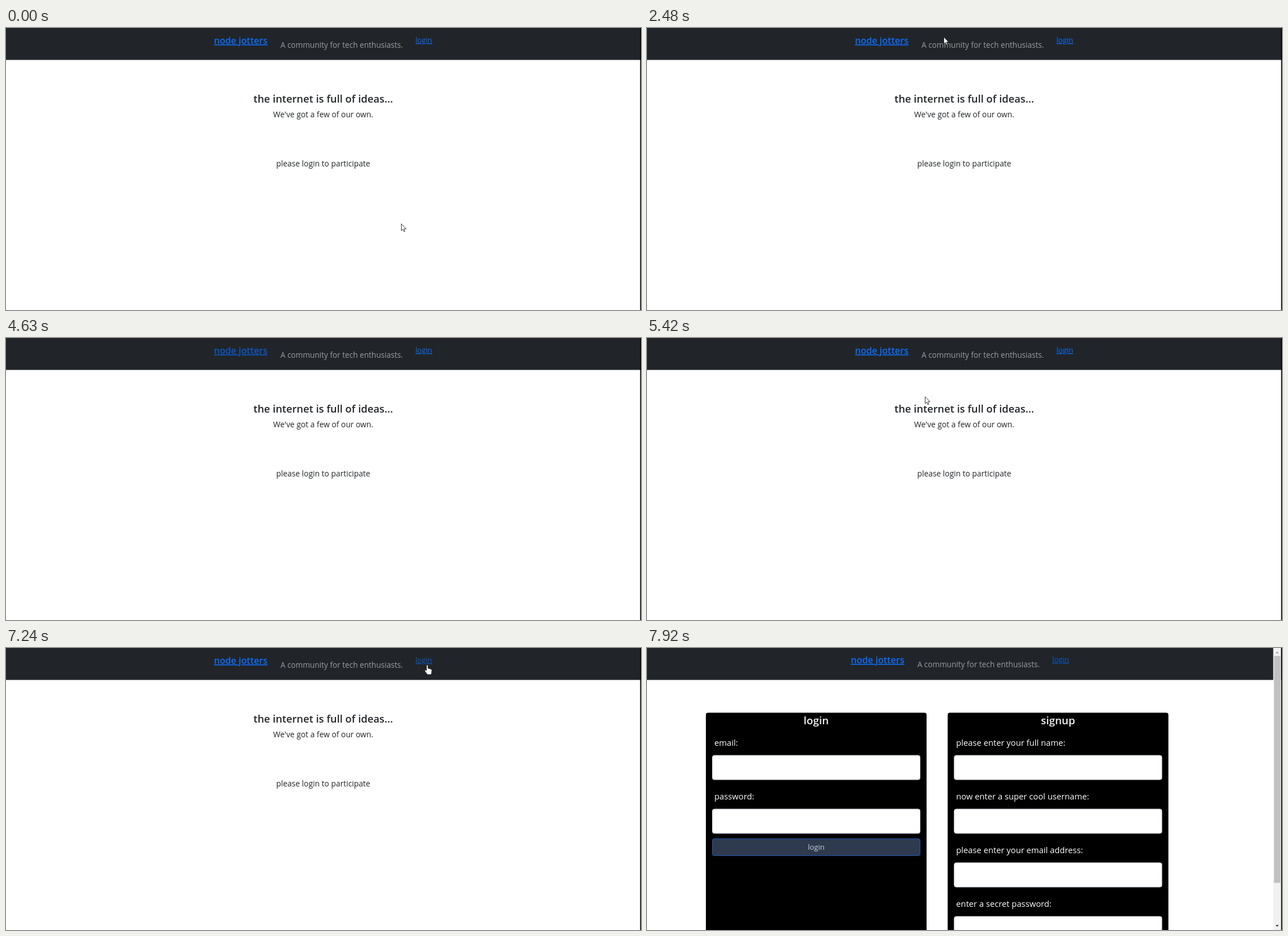
Animation, 1122 px wide and 499 px high, one loop 8 s. Source, as an HTML page:

```html
<!DOCTYPE html>
<html lang="en">
<head>
<meta charset="utf-8">
<style>
  html, body { margin: 0; width: 100%; height: 100%; overflow: hidden; background: #fff; }
  svg { display: block; font: 13.8px "Open Sans", "Noto Sans", sans-serif; fill: #212529; }
  .link { fill: #0d6efd; text-decoration: underline; }
  .link.hover { fill: #0a58ca; }
  .strong { font-weight: 600; }
  .mid { text-anchor: middle; }
  .label { font-size: 14.75px; fill: #fff; }
  .title { font-size: 18.8px; fill: #f4f4f4; }
  .field { fill: #fff; stroke: #ced4da; }
  .pointer { fill: #fff; stroke: #222; stroke-width: .9; stroke-linejoin: round; }
</style>
</head>
<body>
<svg width="1122" height="499" viewBox="0 0 1122 499">
  <rect width="1122" height="56.5"/>
  <g id="nav">
    <text id="brand" class="link strong" x="367.5" y="28" font-size="16.1">node jotters</text>
    <text x="485" y="34.5" font-size="13.6" fill="#9b9d9f">A community for tech enthusiasts.</text>
    <text id="login" class="link" x="723.5" y="26" font-size="13">login</text>
  </g>
  <g id="home" class="mid">
    <text class="strong" x="560.5" y="132" font-size="18.3">the internet is full of ideas...</text>
    <text x="560.5" y="158">We've got a few of our own.</text>
    <text x="560.5" y="245">please login to participate</text>
  </g>
  <g id="forms">
    <g id="cards"></g>
    <rect x="115.5" y="337.5" width="367" height="30" rx="3" fill="#2e3a4e" stroke="#1d55b5"/>
    <text class="mid" x="299" y="357" font-size="13" fill="#c6d6da">login</text>
    <rect x="1106.5" width="14" height="499" fill="#f1f1f1"/>
    <rect x="1108" y="14" width="11" height="401.5" fill="#c1c1c1"/>
    <path d="M1110.5 9.5h6l-3-3.5z" fill="#a3a3a3"/>
    <path d="M1110.5 490h6l-3 3.5z" fill="#505050"/>
  </g>
  <rect x="1120.5" width="1.5" height="499" fill="#000"/>
  <path id="arrow" class="pointer" d="M.5.5V12.6L3.2 10.2 5.1 14.5 7 13.6 5.2 9.4H9z"/>
  <path id="hand" class="pointer" d="M4 1.8q1.4-1.6 2.8 0V7l5 1.3q2 .6 1.7 2.7l-1 7h-7L1 12q-.7-2 1.3-2.3L4 11z"/>
</svg>
<script>
const LOOP = 8000, TICK = 97;
const $ = id => document.getElementById(id);
const show = (el, on) => el.setAttribute('visibility', on ? 'visible' : 'hidden');

function card(x, title, labels) {
  const rows = labels.map((label, i) => `
    <text class="label" x="${x + 15}" y="${173 + 95 * i}">${label}</text>
    <rect class="field" x="${x + 11.5}" y="${190 + 95 * i}" width="367" height="43" rx="3.5"/>`);
  return `<rect x="${x}" y="114.5" width="390" height="400" rx="4" fill="#000"/>
    <text class="title strong mid" x="${x + 195}" y="135">${title}</text>${rows.join('')}`;
}
$('cards').innerHTML =
  card(104, 'login', ['email:', 'password:']) +
  card(531.3, 'signup', ['please enter your full name:', 'now enter a super cool username:',
    'please enter your email address:', 'enter a secret password:']);

// Pointer path: [time, shape, x, y]; a row without a shape hides it.
const path = [
  [0, 'arrow', 698, 346], [1023, 'arrow', 698, 346], [1210, 'arrow', 713, 189],
  [1913, 'arrow', 713, 189], [2480, 'arrow', 524, 15.5], [2680, 'arrow', 530, 130], [2780],
  [2980, 'arrow', 468, 235], [3070, 'arrow', 470, 236], [3170],
  [3560, 'arrow', 647, 230], [3670, 'arrow', 660, 236], [3855, 'arrow', 660, 236],
  [4050, 'arrow', 720, 150], [4530, 'arrow', 480, 45], [4630],
  [4730, 'hand', 424, 28], [4830, 'hand', 419, 28],
  [5300, 'arrow', 450, 60], [5790, 'arrow', 655, 277], [5890],
  [6380, 'arrow', 770, 123], [6480, 'arrow', 785, 105], [6860, 'arrow', 757, 46],
  [6950, 'hand', 748, 34], [7150, 'hand', 743, 31], [7240, 'hand', 739, 29],
  [7840, 'arrow', 741, 53], [7920]
];

function pointerAt(t) {
  const i = path.findLastIndex(row => row[0] <= t);
  const [start, shape, x, y] = path[i];
  const [end, nextShape, nextX, nextY] = path[i + 1] || [LOOP];
  const still = shape !== nextShape || shape === 'hand';
  if (!shape || still) return { shape, x, y };
  const steps = Math.max(1, Math.round((end - start) / TICK));
  const k = Math.floor((t - start) / (end - start) * steps) / steps;
  return { shape, x: x + (nextX - x) * k, y: y + (nextY - y) * k };
}

function draw(now) {
  const t = now % LOOP;
  const onForms = t >= 7640;
  show($('home'), !onForms);
  show($('forms'), onForms);
  $('nav').setAttribute('transform', onForms ? 'translate(-7.3 -1)' : '');
  $('brand').classList.toggle('hover', t >= 4630 && t < 5120);
  $('login').classList.toggle('hover', t >= 6950);
  const { shape, x, y } = pointerAt(t);
  for (const id of ['arrow', 'hand']) show($(id), id === shape);
  if (shape) $(shape).setAttribute('transform', `translate(${x} ${y})`);
  requestAnimationFrame(draw);
}
draw(performance.now());
</script>
</body>
</html>
```
